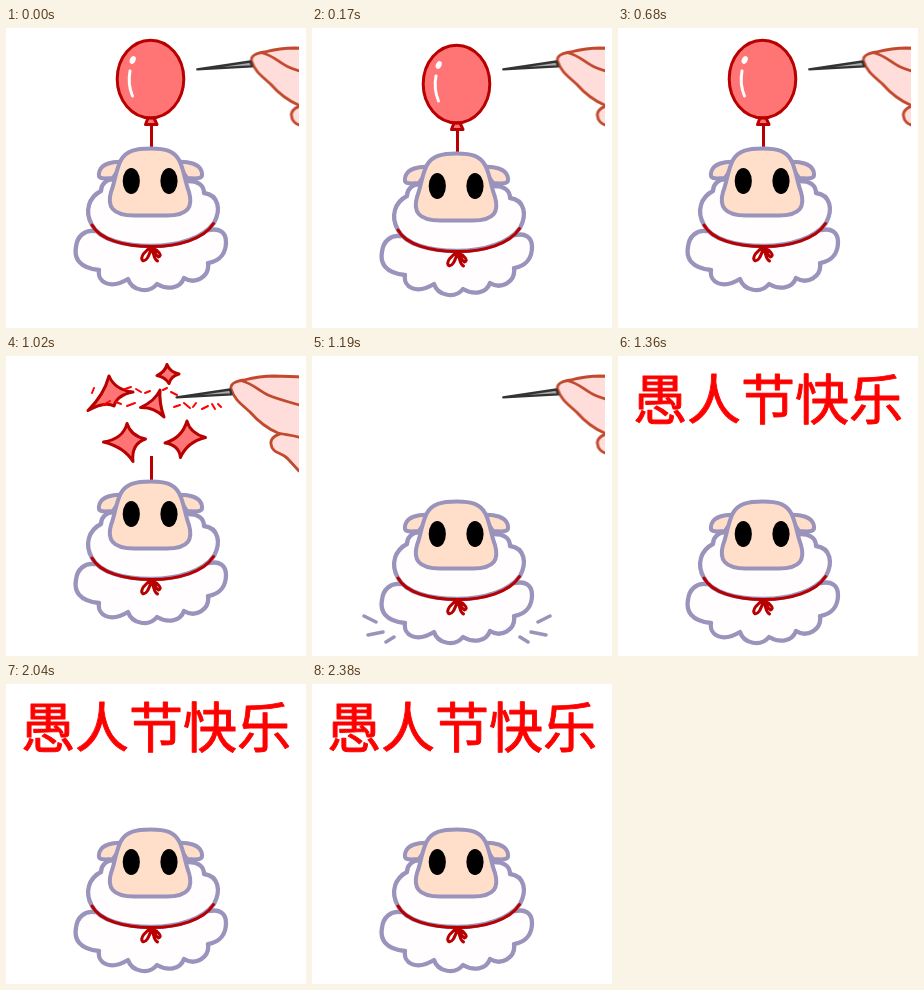
An HTML page for the animation above (2.55 s loop, 300x300 px).

```html
<!DOCTYPE html>
<html lang="zh-CN">
<head>
<meta charset="utf-8">
<title>愚人节快乐</title>
<style>
  html, body { margin: 0; width: 100%; height: 100%; overflow: hidden; background: #fff; }
  svg { display: block; width: 100vw; height: 100vh; }
  path, line { stroke-linecap: round; stroke-linejoin: round; }

  .anim { animation: 2550ms step-end infinite; }
  #sheep, #balloon { animation-name: bob; }
  #balloon-art { animation-name: balloon; }
  #string { animation-name: string; }
  #burst { animation-name: burst; }
  #hand { animation-name: poke; }
  #impact { animation-name: impact; }
  #open { animation-name: open; }
  #shut { animation-name: shut; }
  #greeting { animation-name: flash; }

  @keyframes bob {
    0%, 13.33%, 26.66% { transform: translateY(0); }
    6.66%, 20%, 33.33% { transform: translateY(5px); }
    46.66%, 100% { transform: translateY(25px); }
  }
  @keyframes balloon { 0% { opacity: 1; } 40%, 100% { opacity: 0; } }
  @keyframes string { 0% { opacity: 1; } 46.66%, 100% { opacity: 0; } }
  @keyframes burst { 0%, 46.66%, 100% { opacity: 0; } 40% { opacity: 1; } }
  @keyframes impact { 0%, 53.33%, 100% { opacity: 0; } 46.66% { opacity: 1; } }
  @keyframes poke {
    0%, 46.66% { transform: translateX(20.5px); opacity: 1; }
    33.33% { transform: translateX(0); opacity: 1; }
    53.33%, 100% { transform: translateX(20.5px); opacity: 0; }
  }
  @keyframes open { 0%, 66.66%, 80%, 100% { opacity: 1; } 60%, 73.33% { opacity: 0; } }
  @keyframes shut { 0%, 66.66%, 80%, 100% { opacity: 0; } 60%, 73.33% { opacity: 1; } }
  @keyframes flash {
    0%, 60%, 73.33%, 86.66% { opacity: 0; }
    53.33%, 66.66%, 80%, 93.33%, 100% { opacity: 1; }
  }

  .wool { fill: #fffdfe; stroke: #9a93bb; stroke-width: 4.3; }
  .skin { fill: #ffdfca; stroke: #9a93bb; stroke-width: 4; }
  .red { fill: #ff7575; stroke: #b80000; stroke-width: 3; }
  .cord { fill: none; stroke: #b80000; stroke-width: 3; }
  .finger { fill: #ffddda; stroke: #c14a2e; stroke-width: 2.8; }
  .crease { fill: none; stroke: #c14a2e; stroke-width: 2.8; }
  text {
    font: 400 54px "Noto Sans CJK SC", "Noto Sans CJK", sans-serif;
    fill: #f00; stroke: #f00; stroke-width: .9; stroke-linejoin: round;
  }
</style>
</head>
<body>
<svg viewBox="0 0 300 300">
  <defs>
    <clipPath id="edge"><rect width="293" height="300"/></clipPath>
  </defs>

  <g id="balloon" class="anim">
    <g id="balloon-art" class="anim">
      <path class="red" stroke-width="2.5" d="M142 90 L139.5 96.500 H151 L148 90 Z"/>
      <ellipse class="red" cx="144.500" cy="51" rx="33.300" ry="38.800"/>
      <ellipse cx="126.700" cy="32" rx="2.800" ry="4" fill="#fff" transform="rotate(25 126.700 32)"/>
      <path d="M124 43 Q121.500 56 126.500 68" fill="none" stroke="#fff" stroke-width="3"/>
    </g>
  </g>

  <g id="sheep" class="anim">
    <path id="string" class="cord anim" style="stroke-linecap:butt" d="M145.500 95 V121"/>

    <path class="wool" d="M88 203 C79 202 71 208 70 219 C68 230 73 240 93 242
      C91 254 104 262 122 251 C126 263 143 266 151 256 C161 262 174 261 178 250
      C189 257 204 249 202 235 C215 233 220 224 220 214 C220 204 213 200 204 202 Z"/>
    <path class="wool" d="M107 151 C99 152 95 157 95 163 C83 169 78 183 86 197
      C93 211 117 218 145 218 C173 218 197 210 208 195 C215 182 213 167 198 165
      C198 158 193 153 182 153 Z"/>
    <path class="cord" d="M86 197 C94 212 119 218.500 146 218.500 C172 218.500 198 211 207.500 195.500"/>
    <path class="cord" stroke-width="2.500" d="M146 219 C139 222 134 229 136.500 232.500
      C141 234 143 227 146 219 C147 226 149 232 151.500 233 M146 220 C152 222 157 228 152.500 229 C149 227 148 223 146 219"/>

    <path class="skin" d="M118 134 C106 133 96 136 93.500 143 C91 151 95 151 107 150 Z"/>
    <path class="skin" d="M170 134 C183 133 193 136 195.500 143 C198 151 193 151 181 150 Z"/>
    <path class="skin" d="M145 120.500 C129 120.500 120 123 115 132 C110 141 109 154 105 164
      C101 178 106 187.500 128 187.500 H161 C183 187.500 187 178 183 164
      C179 154 178 141 173 132 C168 123 160 120.500 145 120.500 Z"/>
    <g id="open" class="anim">
      <ellipse cx="125.300" cy="153" rx="8.600" ry="13"/>
      <ellipse cx="163" cy="153" rx="8.600" ry="13"/>
    </g>
    <path id="shut" class="anim" d="M117 153 Q125 159 134 153 M154.500 153 Q163 159 171.500 153"
      fill="none" stroke="#000" stroke-width="3.500"/>
  </g>

  <g id="impact" class="anim" fill="none" stroke="#9a93bb" stroke-width="3.500">
    <path d="M64 266 L52 260 M71 276 L56 279 M82 281 L74 286"/>
    <path d="M226 266 L238 260 M219 276 L234 279 M208 281 L216 286"/>
  </g>

  <g id="burst" class="anim">
    <path class="red" d="M103 20 Q109 34 127 36 Q111 39 108 50 Q99 45 82 54.500 Q98 39 103 20 Z"/>
    <path class="red" stroke-width="2.500" d="M161 8.500 Q164 16 173 18 Q165 20 163 27.500 Q159 21 151 19.500 Q159 16 161 8.500 Z"/>
    <path class="red" d="M154 34 Q153 47 158 61 Q148 51 134.500 51.500 Q149 45 154 34 Z"/>
    <path class="red" d="M121 67.500 Q125 80 139.500 83 Q125 88 127 105.500 Q118 91 97.500 86 Q117 83 121 67.500 Z"/>
    <path class="red" d="M181 65 Q184 77 199.500 81.500 Q181 86 174.500 101.500 Q173 89 159 87 Q176 82 181 65 Z"/>
    <path fill="none" stroke="#f00" stroke-width="2" d="M86 37 L88 32 M119 33 L125 31
      M130 33 L135 36 M139 37 L144 35 M157 34 L161 32 M165 36 L171 39
      M97 49 L104 45 M110 46 L115 48 M121 50 L129 47
      M168 51 L174 49 M178 47 L184 52 M187 51 L190 47 M196 53 L202 50 M206 48 L209 53 M212 48 L215 51"/>
  </g>

  <g clip-path="url(#edge)">
    <g id="hand" class="anim">
      <path class="finger" d="M281 77 C271 77 264 82 265 88 C266 98 276 96 282 103 L293 115 L330 130 V70 Z"/>
      <path class="finger" d="M225 33 C224 27 231 25 238 24 C250 21 258 20 268 20
        L330 22 V100 L300 84 C292 79 280 79 272 77 C260 72 251 64 244 56 C235 48 228 43 225 33 Z"/>
      <path class="crease" d="M236 25 C246 27 253 35 262 39 C271 43 283 46 300 51"/>
      <path d="M170.500 41.300 L224 33.500 L225.500 38.300 Z" fill="#aaa" stroke="#333" stroke-width="2.300"/>
    </g>
  </g>

  <text id="greeting" class="anim" x="15" y="63.500">愚人节快乐</text>
</svg>
</body>
</html>
```
